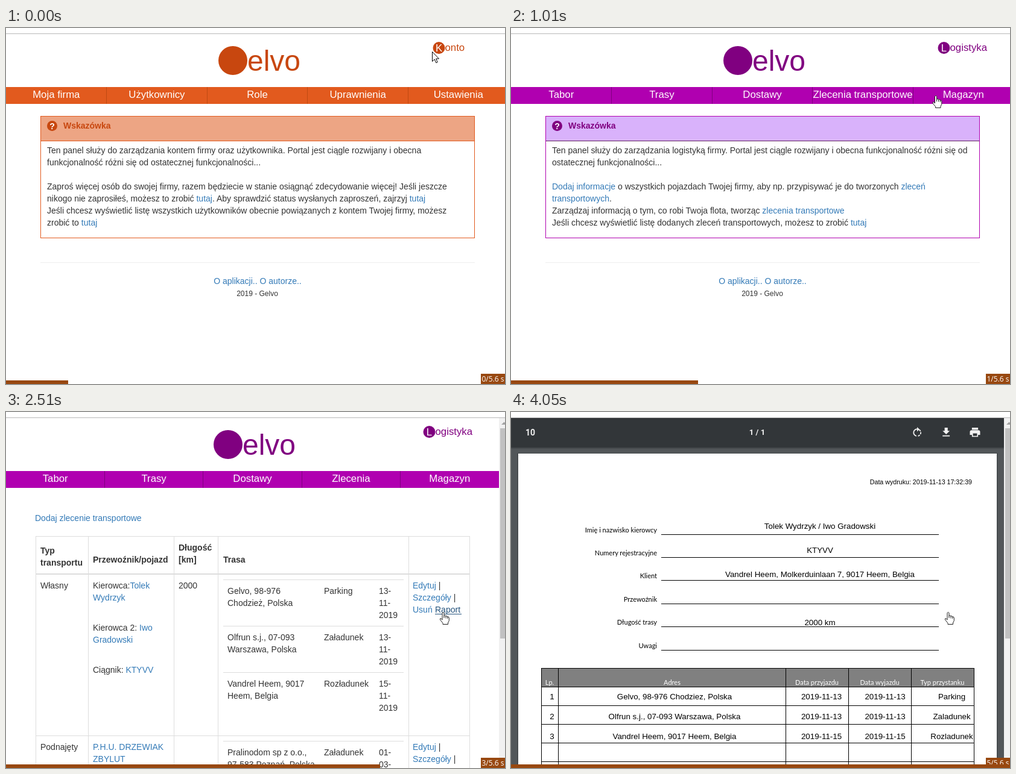
These frames come from a looping animation (827 by 591 pixels, 5600 ms). An HTML page:

```html
<!DOCTYPE html>
<html lang="pl">
<head>
<meta charset="utf-8">
<title>Panel</title>
<style>
html, body { margin: 0; width: 100%; height: 100%; overflow: hidden; background: #fff; }
svg { display: block; position: absolute; left: 0; top: 0; }
text { font-family: "Liberation Sans", Arial, Helvetica, sans-serif; white-space: pre; }
.pdf-label { font-family: Lato, Carlito, sans-serif; }
.bold { font-weight: 700; }
.clock { font-family: "Open Sans", "Noto Sans", sans-serif; }
.viewer { font-family: Roboto, sans-serif; font-weight: 700; }
</style>
</head>
<body>
<svg id="stage" width="827" height="591" viewBox="0 0 827 591"></svg>
<script>
const LINK = '#337ab7', INK = '#333', BROWN = '#984810';
const ORANGE = { dark: '#c8470f', main: '#e25a1e', sep: '#c04a12', head: '#eda584', rule: '#e25a1e' };
const PURPLE = { dark: '#800080', main: '#b000b0', sep: '#800080', head: '#d9b2fb', rule: '#602060' };
// page widths without and with a scrollbar; the wide one runs past the stage
const WIDE = 833, NARROW = 817;
const BRAND = 'Gelvo';
const DRIVERS = ['Tolek', 'Wydrzyk', 'Iwo', 'Gradowski'];
const PLATE = 'KTYVV';

const rect = (x, y, w, h, fill) => `<rect x="${x}" y="${y}" width="${w}" height="${h}" fill="${fill}"/>`;
const disc = (x, y, r, fill) => `<circle cx="${x}" cy="${y}" r="${r}" fill="${fill}"/>`;
const hline = (x1, x2, y, fill, h = 1) => rect(x1, y, x2 - x1, h, fill);
const vline = (x, y1, y2, fill) => rect(x, y1, 1, y2 - y1, fill);

function text(x, y, str, { size = 14, fill = INK, anchor = 'start', cls = '' } = {}) {
  // {braces} mark links
  const runs = str.replace(/\{(.*?)\}/g, `<tspan fill="${LINK}">$1</tspan>`);
  return `<text x="${x}" y="${y}" font-size="${size}" fill="${fill}" text-anchor="${anchor}" class="${cls}">${runs}</text>`;
}
const lines = (x, y, rows, step = 20, opts) =>
  rows.map((row, i) => row && text(x, y + i * step, row, opts)).join('');
const mid = (x, y, str, opts) => text(x, y, str, { anchor: 'middle', ...opts });

function badge(x, y, word, fill) {
  return disc(x, y, 10, fill) +
    mid(x, y + 6, word[0], { size: 16.8, fill: '#fff' }) +
    text(x + 10, y + 5, word.slice(1), { size: 16.8, fill });
}

function header(width, theme, module, items) {
  const cx = width / 2, cell = width / 5;
  let out = rect(0, 0, 827, 591, '#fff') +
    disc(cx - 40.5, 54, 24, theme.dark) +
    text(cx - 16.5, 71, BRAND.slice(1), { size: 48, fill: theme.dark }) +
    badge(width - 115.5, 33, module, theme.dark) +
    rect(0, 98, width, 28, theme.main);
  items.forEach((item, i) => {
    if (i) out += vline(Math.floor(i * cell), 98, 126, theme.sep);
    out += mid((i + 0.5) * cell, 116, item, { size: 16.8, fill: '#fff' });
  });
  return out;
}

function hintPage(theme, module, items, rows) {
  return header(WIDE, theme, module, items) +
    rect(57, 146, 720, 203, theme.main) + rect(58, 147, 718, 201, '#fff') +
    rect(58, 147, 718, 40, theme.head) + hline(58, 776, 187, theme.rule) +
    disc(76.5, 162.5, 8.5, theme.dark) +
    mid(76.5, 167.5, '?', { fill: '#fff', cls: 'bold' }) +
    text(95, 167, 'Wskazówka', { fill: theme.dark, cls: 'bold' }) +
    lines(68, 208, rows) +
    hline(57, 777, 389, '#eee') +
    mid(417, 425, '{O aplikacji..} {O autorze..}') +
    mid(416.5, 445, '2019 - ' + BRAND, { size: 12 });
}

const scrollbar = () =>
  rect(817, 10, 10, 581, '#f1f1f1') + rect(819, 27, 8, 349, '#c1c1c1') +
  '<path d="M821 21L825.5 16.5L830 21Z" fill="#a3a3a3"/>';

function stop(y, place, kind, date) {
  return hline(360, 659, y, '#ddd') + lines(367, y + 24, place) +
    text(527, y + 24, kind) + lines(618, y + 24, date);
}

function ordersPage() {
  const grey = '#ddd', bold = { cls: 'bold' };
  return header(NARROW, PURPLE, 'Logistyka', ['Tabor', 'Trasy', 'Dostawy', 'Zlecenia', 'Magazyn']) +
    text(48, 181, '{Dodaj zlecenie transportowe}') +
    hline(49, 769, 206, grey) + hline(49, 769, 268, grey, 2) + hline(49, 769, 537, grey) +
    [49, 136, 278, 351, 667, 768].map(x => vline(x, 206, 591, grey)).join('') +
    lines(57, 235, ['Typ', 'transportu'], 20, bold) +
    text(144, 250, 'Przewoźnik/pojazd', bold) +
    lines(286, 230, ['Długość', '[km]'], 20, bold) +
    text(360, 250, 'Trasa', bold) +
    text(57, 293, 'Własny') + text(286, 293, '2000') +
    lines(144, 293, [`Kierowca:{${DRIVERS[0]}}`, `{${DRIVERS[1]}}`]) +
    lines(144, 363, [`Kierowca 2: {${DRIVERS[2]}}`, `{${DRIVERS[3]}}`]) +
    text(144, 433, `Ciągnik: {${PLATE}}`) +
    stop(278, [BRAND + ', 98-976', 'Chodzież, Polska'], 'Parking', ['13-', '11-', '2019']) +
    stop(355, ['Olfrun s.j., 07-093', 'Warszawa, Polska'], 'Załadunek', ['13-', '11-', '2019']) +
    stop(432, ['Vandrel Heem, 9017', 'Heem, Belgia'], 'Rozładunek', ['15-', '11-', '2019']) +
    lines(674, 293, ['{Edytuj} |', '{Szczegóły} |', '{Usuń}']) +
    text(711, 333, '{Raport}') +
    text(57, 561, 'Podnajęty') +
    lines(144, 561, ['{P.H.U. DRZEWIAK}', '{ZBYLUT}']) +
    stop(546, ['Pralinodom sp z o.o.,', '97-583 Poznań, Polska'], 'Załadunek', ['01-', '03-']) +
    lines(674, 561, ['{Edytuj} |', '{Szczegóły} |']) +
    scrollbar();
}

function reportPage() {
  const fields = [
    ['Imię i nazwisko kierowcy', `${DRIVERS[0]} ${DRIVERS[1]} / ${DRIVERS[2]} ${DRIVERS[3]}`, 203, 194],
    ['Numery rejestracyjne', PLATE, 241, 234],
    ['Klient', 'Vandrel Heem, Molkerduinlaan 7, 9017 Heem, Belgia', 279, 274],
    ['Przewoźnik', '', 318, 314],
    ['Długość trasy', '2000 km', 356, 354],
    ['Uwagi', '', 395, 391]
  ];
  const stops = [
    [BRAND + ', 98-976 Chodziez, Polska', '2019-11-13', 'Parking'],
    ['Olfrun s.j., 07-093 Warszawa, Polska', '2019-11-13', 'Zaladunek'],
    ['Vandrel Heem, 9017 Heem, Belgia', '2019-11-15', 'Rozladunek']
  ];
  const body = { size: 13.33, fill: '#000' };
  let out = rect(0, 10, 827, 581, '#525659') + rect(10, 68, 797, 523, '#484c4f') +
    rect(12, 69, 793, 522, '#fff') + rect(0, 10, 817, 49, '#323639') +
    rect(0, 59, 817, 2, '#45494c') +
    text(24, 39, '10', { fill: '#f1f1f1', cls: 'viewer' }) +
    mid(408, 38, '1 / 1', { size: 13, fill: '#f1f1f1', cls: 'viewer' }) +
    `<g fill="#f1f1f1">
      <path d="M674 28.5A5.7 5.7 0 0 0 672 39.8" fill="none" stroke="#f1f1f1" stroke-width="1.8"/>
      <path d="M674.5 39.8A5.7 5.7 0 0 0 675.5 28.9" fill="none" stroke="#f1f1f1" stroke-width="1.8" stroke-dasharray="3.5 1.5"/>
      <path d="M673 25L677 28.7L673 32.4Z"/>
      <path transform="translate(711 23.5) scale(.85)" d="M19 9h-4V3H9v6H5l7 7 7-7zM5 18v2h14v-2H5z"/>
      <path transform="translate(758.8 23.5) scale(.85)" fill-rule="evenodd" d="M19 8H5c-1.7 0-3 1.3-3 3v6h4v4h12v-4h4v-6c0-1.7-1.3-3-3-3zM16 19H8v-5h8zM18 3H6v4h12z"/>
    </g>` +
    text(764, 120, 'Data wydruku: 2019-11-13 17:32:39', { size: 10.67, fill: '#000', anchor: 'end' });
  for (const [name, value, y, base] of fields) {
    out += text(242, y - 3, name, { size: 11, fill: '#000', anchor: 'end', cls: 'pdf-label' }) +
      hline(249, 709, y, '#000') + mid(512, base, value, body);
  }
  out += rect(50, 426, 718, 31, '#808080');
  ['Lp.', 'Adres', 'Data przyjazdu', 'Data wyjazdu', 'Typ przystanku'].forEach((name, i) => {
    out += mid([64, 267, 507, 611, 715][i], 453, name, { size: 11, fill: '#fff', cls: 'pdf-label' });
  });
  out += [425, 456, 487, 518, 549, 580].map(y => hline(50, 768, y, '#000')).join('') +
    [50, 78, 455, 559, 663, 767].map(x => vline(x, 425, 591, '#000')).join('');
  stops.forEach(([place, date, kind], i) => {
    [i + 1, place, date, date, kind].forEach((cell, c) => {
      out += mid([68, 271, 514.5, 620, 730.5][c], 477 + i * 33, String(cell), body);
    });
  });
  return out + scrollbar();
}

const dropdown = (x, w, label) =>
  rect(x, 98, w, 56, PURPLE.dark) +
  `<path d="M${x} 126.5h${w}" stroke="${PURPLE.main}" stroke-dasharray="3 2"/>` +
  mid(x + w / 2, 116, label, { size: 16.8, fill: '#fff' }) +
  mid(x + w / 2, 149, 'Nowe zlecenie', { fill: '#fff' });

const layers = {
  account: hintPage(ORANGE, 'Konto',
    ['Moja firma', 'Użytkownicy', 'Role', 'Uprawnienia', 'Ustawienia'], [
      'Ten panel służy do zarządzania kontem firmy oraz użytkownika. Portal jest ciągle rozwijany i obecna',
      'funkcjonalność różni się od ostatecznej funkcjonalności...', '',
      'Zaproś więcej osób do swojej firmy, razem będziecie w stanie osiągnąć zdecydowanie więcej! Jeśli jeszcze',
      'nikogo nie zaprosiłeś, możesz to zrobić {tutaj}. Aby sprawdzić status wysłanych zaproszeń, zajrzyj {tutaj}',
      'Jeśli chcesz wyświetlić listę wszystkich użytkowników obecnie powiązanych z kontem Twojej firmy, możesz',
      'zrobić to {tutaj}'
    ]),
  logistics: hintPage(PURPLE, 'Logistyka',
    ['Tabor', 'Trasy', 'Dostawy', 'Zlecenia transportowe', 'Magazyn'], [
      'Ten panel służy do zarządzania logistyką firmy. Portal jest ciągle rozwijany i obecna funkcjonalność różni się od',
      'ostatecznej funkcjonalności...', '',
      '{Dodaj informacje} o wszystkich pojazdach Twojej firmy, aby np. przypisywać je do tworzonych {zleceń}',
      '{transportowych}.',
      'Zarządzaj informacją o tym, co robi Twoja flota, tworząc {zlecenia transportowe}',
      'Jeśli chcesz wyświetlić listę dodanych zleceń transportowych, możesz to zrobić {tutaj}'
    ]),
  orders: ordersPage(),
  blank: rect(0, 10, 827, 581, '#525659'),
  report: reportPage(),
  modules: rect(680, 56, 112, 84, '#ddd') + rect(681, 57, 110, 82, '#fff') +
    badge(698, 76, 'Konto', ORANGE.dark) + badge(698, 115, 'Logistyka', PURPLE.dark),
  menuWide: dropdown(499, 168, 'Zlecenia transportowe'),
  menuShort: dropdown(490, 164, 'Zlecenia'),
  reportHover: rect(710, 320, 46, 18, '#fff') + text(711, 333, 'Raport', { fill: '#23527c' }) +
    hline(711, 755, 335, '#23527c'),
  topLine: hline(0, 827, 9, '#b8b8b8'),
  arrow: '<path d="M.5 .5V16.5L4.2 13L6.8 18.8L9.2 17.7L6.7 12H11.5Z" fill="#fff" stroke="#000"/>',
  hand: '<path d="M-1.5 1.5Q0 -.8 1.5 1.5V6.5Q3.5 4.8 4.5 7Q6.5 5.7 7.3 8Q9.5 7.2 9.8 10V14.5L8 18V20.5H-.5V18.5L-5 12.8Q-5.5 10 -3.5 10.8L-1.5 13Z" fill="#fff" stroke="#222"/>' +
    '<path d="M1.5 6V10M4.5 7V10.5M7.3 8V11" stroke="#222"/>'
};

// start time, visible layers, cursor kind and place, seconds shown
const steps = [
  [0, 'account', 'arrow', 706, 39, 0],
  [500, 'account modules', 'hand', 704, 112, 1],
  [1010, 'logistics', 'hand', 704, 112, 1],
  [1510, 'logistics menuWide', 'hand', 612.5, 99, 2],
  [2010, 'orders menuShort', 'hand', 612.5, 99, 2],
  [2510, 'orders reportHover', 'hand', 724.5, 332, 3],
  [3010, 'blank', 'hand', 724.5, 332, 4],
  [4050, 'report', 'hand', 724.5, 332, 5]
];
const LOOP = 5600;

const stage = document.getElementById('stage');
stage.innerHTML = rect(0, 0, 827, 591, '#fff') +
  Object.entries(layers).map(([id, art]) => `<g id="${id}" display="none">${art}</g>`).join('') +
  rect(787, 574, 40, 17, BROWN) +
  text(788.5, 587, '', { size: 12, fill: '#fff', cls: 'clock' }) +
  `<rect id="bar" y="585" height="6" fill="${BROWN}"/>`;
const clock = stage.querySelector('.clock');
const bar = document.getElementById('bar');
let shown = -1;

function show(index) {
  const [, names, cursor, x, y, sec] = steps[index];
  const visible = [...names.split(' '), 'topLine', cursor];
  for (const id in layers) {
    document.getElementById(id).setAttribute('display', visible.includes(id) ? 'inline' : 'none');
  }
  document.getElementById(cursor).setAttribute('transform', `translate(${x} ${y})`);
  clock.textContent = sec + '/5.6 s';
  bar.setAttribute('width', Math.round(827 * (index + 1) / steps.length));
  shown = index;
}

const begin = performance.now();
function tick() {
  const time = (performance.now() - begin) % LOOP;
  const index = steps.findLastIndex(step => step[0] <= time);
  if (index !== shown) show(index);
  requestAnimationFrame(tick);
}
show(0);
requestAnimationFrame(tick);
</script>
</body>
</html>
```
